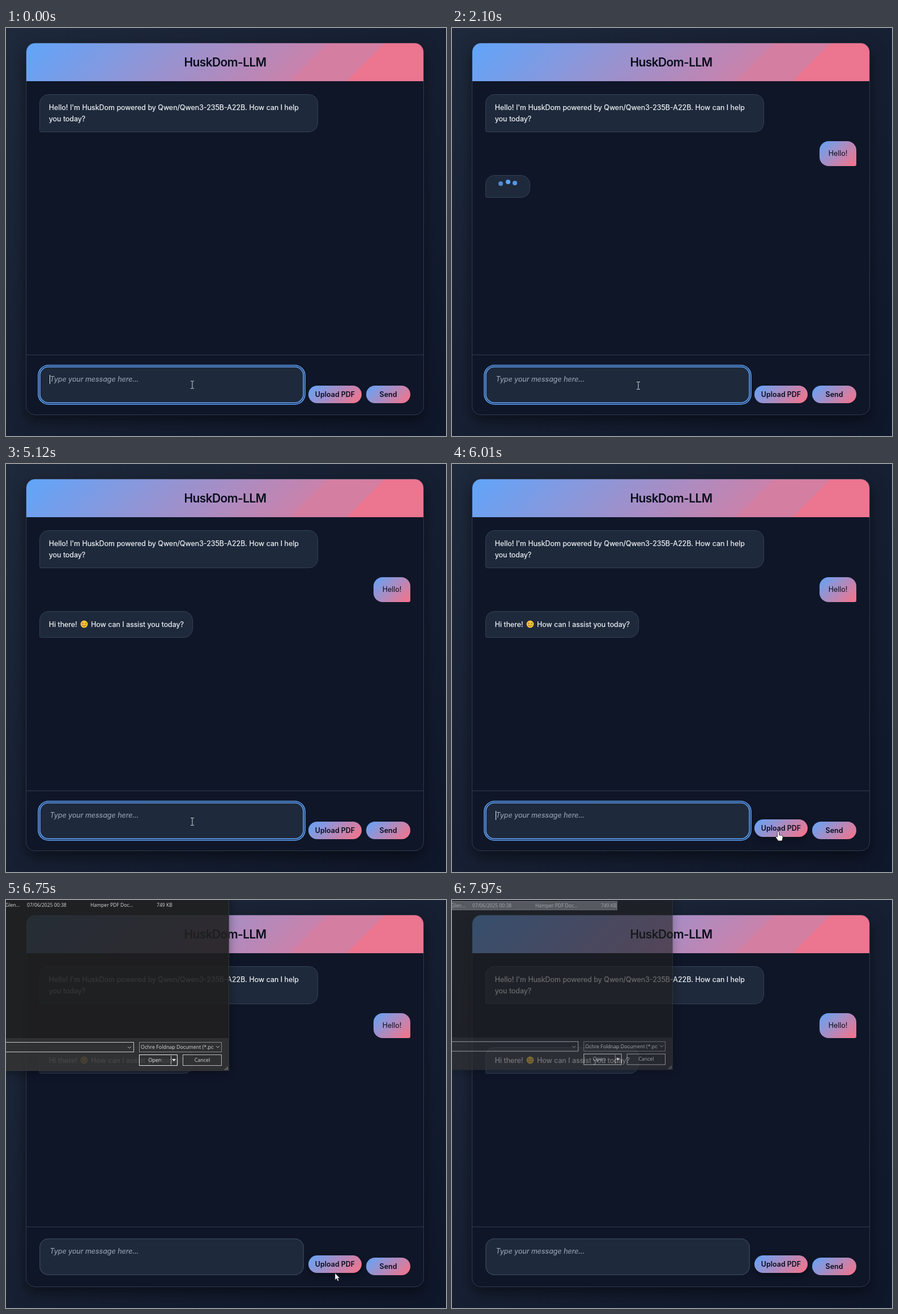
Write an HTML page that moves like this. It is 777 px wide and 721 px high and loops after 8000 ms.

```html
<!DOCTYPE html>
<html lang="en">
<head>
<meta charset="utf-8">
<title>Chat</title>
<style>
html, body { margin: 0; width: 100%; height: 100%; overflow: hidden; }
body { background: linear-gradient(135deg, #1e293b, #0f172a); font: 12.48px/20px Inter, sans-serif; color: #f1f5f9; }
div, svg, span.abs { position: absolute; box-sizing: border-box; white-space: nowrap; }
#card { left: 35px; top: 26px; width: 703px; height: 658px; border: 1px solid #303c50; border-radius: 16px;
  background: #0f1628; box-shadow: 0 10px 26px rgba(0,0,0,.5); overflow: hidden; }
#head { left: 0; top: 0; width: 702px; height: 67px; text-align: center; color: #080d1a;
  font-size: 21px; font-weight: 600; line-height: 67px; letter-spacing: -.6px;
  background: linear-gradient(135deg, #60a5fa, #c982ab 69.2%, #d47ea2 69.2%, #d47ea2 82.3%, #ec758f 82.3%); }
#rule { left: 0; top: 550px; width: 702px; height: 1px; background: #303c50; }
.bot { left: 59px; background: #1e293b; border: 1px solid #334155; border-radius: 16px 16px 16px 3px; padding: 12.5px 15.8px; }
.bot, #hint { -webkit-text-stroke: .2px; }
.grad { background: linear-gradient(135deg, #60a5fa, #fb7185); color: #080d1a; }
#user { left: 649px; top: 200px; width: 65px; height: 44px; line-height: 44px; text-align: center; border-radius: 16px 16px 3px 16px; }
.btn { top: 632px; height: 31px; line-height: 31px; border-radius: 16px; text-align: center; font-weight: 600; }
.dot { width: 8px; height: 8px; border-radius: 50%; background: #60a5fa; }
#box, #ring { left: 59px; top: 598px; width: 467px; height: 65px; border-radius: 16px; }
#box { background: #1e293b; box-shadow: inset 0 0 0 1.5px #334155; }
#ring { box-shadow: inset 0 0 0 1.6px #60a5fa, 0 0 0 1.2px #14203a, 0 0 0 2.8px #60a5fa; }
#hint { left: 77.5px; top: 611px; font-style: italic; color: #929daf; }
#typed { left: 76.5px; top: 611px; }
#caret { left: 100%; top: 2px; width: 1px; height: 16px; background: #f1f5f9; }
#dlg { left: -558px; top: -82px; width: 952px; height: 384px; background: #202020; border: 1px solid #3c3c3c;
  box-shadow: 0 3px 16px rgba(0,0,0,.4); transform-origin: 50% 50%; color: #eee; font: 8.6px/16px "Open Sans", sans-serif; }
/* moves the inner coordinates back to the stage's */
#in { left: 557px; top: 81px; width: 394px; height: 302px; }
#row { left: -400px; top: 1px; width: 695px; height: 16px; }
#foot { left: -557px; top: 244px; width: 950px; height: 57px; background: #333; }
.field, .push { font-size: 8.9px; }
.field { height: 18px; top: 251px; border: 1px solid #999; overflow: hidden; }
.push { top: 273px; height: 20px; line-height: 18px; text-align: center; border: 1px solid #ccc; }
</style>
</head>
<body>
<div id="card"><div id="head">HuskDom-LLM</div><div id="rule"></div></div>
<div class="bot" style="top:117px;width:492px;height:67px">Hello! I'm HuskDom powered by Qwen/Qwen3-235B-A22B. How can I help<br>you today?</div>
<div id="user" class="grad">Hello!</div>
<div id="wait" class="bot" style="top:260px;width:79px;height:40px">
  <div class="dot" style="left:22px"></div><div class="dot" style="left:34.5px"></div><div class="dot" style="left:47px"></div>
</div>
<div id="reply" class="bot" style="top:260px;width:271px;height:47px">Hi there!
  <svg style="left:71px;top:15px" width="14" height="14" viewBox="0 0 14 14" fill="none" stroke="#6b3f10" stroke-linecap="round">
    <circle cx="7" cy="7" r="6.4" fill="#fcc63a" stroke="none"/>
    <path d="M3 5.7q1.3-1.8 2.6 0M8.4 5.7q1.3-1.8 2.6 0M3.6 8.4q3.4 4 6.8 0"/>
  </svg>
  <span class="abs" style="left:90px">How can I assist you today?</span>
</div>
<div id="box"></div><div id="ring"></div>
<div id="hint">Type your message here...</div>
<div id="typed"><span id="text"></span><div id="caret"></div></div>
<div id="upload" class="btn grad" style="left:534px;width:94px">Upload PDF</div>
<div class="btn grad" style="left:636px;width:78px">Send</div>

<div id="dlg"><div id="in">
  <div id="row"></div>
  <span class="abs" style="left:-1px;top:1px">Glen...</span>
  <span class="abs" style="left:37px;top:1px">07/06/2025 00:38</span>
  <span class="abs" style="left:149px;top:1px">Hamper PDF Doc...</span>
  <span class="abs" style="left:266px;top:1px">749 KB</span>
  <div id="foot"></div>
  <div class="field" style="left:-400px;width:626px;border-color:#ddd"></div>
  <div class="field" style="left:235px;width:146px"><div style="left:2px;width:128px;overflow:hidden">Ochre Foldnap Document (*.pdf)</div></div>
  <div class="push" style="left:235px;width:68px;border:1.5px solid #fff;padding-right:12px">Open</div>
  <div class="push" style="left:312px;width:69px">Cancel</div>
  <svg width="394" height="302" fill="none" stroke="#ccc">
    <path d="M215 259l3 3 3-3M371 258l3 3 3-3M291.5 275v16"/>
    <path d="M293 281h7l-3.5 4z" fill="#fff" stroke="none"/>
    <path d="M386 299.5h6M388 297.5h4M390.5 295.5h2" stroke-dasharray="1.5 1"/>
  </svg>
</div></div>

<svg id="mouse" width="1" height="1" overflow="visible" style="left:0;top:0">
  <path d="M-3-6.5h2.5l.5.5.5-.5H3M0-6V6M-3 6.5h2.5L0 6l.5.5H3" fill="none" stroke="#d5d9df"/>
  <path d="M0 0V12l2.8-2.6 2 4.6 2-.9-2-4.4H8.5z" fill="#fff" stroke="#111" stroke-width=".6"/>
  <path d="M-1.5 1.5a1.5 1.5 0 0 1 3 0v5l5 1.2q2 .5 1.8 2.5l-.8 4.3-1 2.500h-6.5q-2.5-3.5-4.5-6.5 0-2 2-1.2l1 1z" fill="#fff" stroke="#111" stroke-width=".8"/>
</svg>

<script>
const $ = id => document.getElementById(id);
const LOOP = 8000, SENT = 1480, REPLY = 4450, BLUR = 6350, OPEN = 6645, CLOSE = 7900;
const clamp = x => Math.max(0, Math.min(1, x));
const ramp = (t, from, length) => clamp((t - from) / length);
const smooth = x => x * x * (3 - 2 * x);
const easeOut = x => 1 - (1 - x) ** 3;
const dots = [...document.querySelectorAll('.dot')];
const cursors = [...$('mouse').children];

// time, x, y of the pointer
const path = [
  [0, 329, 630.5], [69, 329, 630.5], [70, 329, 632], [5350, 329, 632], [5520, 430, 636],
  [5700, 550, 645], [5950, 576, 649], [6640, 576, 649], [6720, 581, 659.5], [6890, 581, 659.5],
  [6960, 515, 598], [7030, 280, 417], [7100, 44, 236], [7170, -200, 50], [LOOP, -200, 50]
];

function pointer(t) {
  const i = path.findIndex(p => p[0] > t);
  const [a, b] = [path[i - 1], path[i]];
  const k = (t - a[0]) / (b[0] - a[0]);
  return [a[1] + (b[1] - a[1]) * k, a[2] + (b[2] - a[2]) * k];
}

function caretOn(t) {
  if (t < 70) return true;
  if (t < 550 || t >= 6180) return false;
  if (t < SENT) return true;
  const left = (5120 - t + 2 * 1060) % 1060;
  return left > 0 && left <= 530;
}

function show(el, t, from, to) {
  const k = t < to ? smooth(ramp(t, from, 300)) : 0;
  el.style.opacity = k;
  el.style.transform = `translateY(${(1 - k) * 7.8}px)`;
}

function draw(t) {
  show($('user'), t, SENT - 30, LOOP);
  show($('wait'), t, SENT - 30, REPLY);
  show($('reply'), t, REPLY, LOOP);

  dots.forEach((dot, i) => {
    const p = ((t - 1495 - i * 160 + 2 * 1400) % 1400) / 1400;
    const k = smooth(clamp(1 - Math.abs(p - .3) / .3));
    dot.style.top = 15 - 7.8 * k + 'px';
    dot.style.opacity = .5 + .5 * k;
  });

  let count = 0;
  if (t >= 550 && t < SENT) count = t >= 1280 ? 6 : Math.min(5, 1 + Math.floor((t - 550) / 132));
  $('text').textContent = 'Hello!'.slice(0, count);
  $('hint').style.opacity = count ? 0 : 1;
  $('caret').style.opacity = caretOn(t) ? 1 : 0;
  $('ring').style.opacity = 1 - ramp(t, BLUR, 200);

  const lift = smooth(ramp(t, 5690, 300));
  $('upload').style.transform = `translateY(${-3.9 * lift}px)`;
  $('upload').style.boxShadow = `0 4px 12px rgba(0,0,0,${.4 * lift})`;

  const opened = easeOut(ramp(t, OPEN, 200)), closing = Math.max(0, t - CLOSE) / 70;
  $('dlg').style.opacity = opened * (1 - .35 * closing);
  $('dlg').style.transform = `scale(${.982 + .02 * opened - .0104 * closing})`;
  $('row').style.background = t < 7700 ? 'none' : t < 7770 ? '#4d4d4d' : '#777';
  $('row').style.boxShadow = t < 7770 ? 'none' : 'inset 0 0 0 1px #999';

  const [x, y] = pointer(t);
  const kind = t >= OPEN ? 1 : x > 534 ? 2 : x > 527 ? 1 : 0;
  cursors.forEach((c, i) => c.style.display = i === kind ? '' : 'none');
  $('mouse').style.transform = `translate(${x}px,${y}px)`;
}

const start = performance.now();
function tick() {
  draw((performance.now() - start) % LOOP);
  requestAnimationFrame(tick);
}
tick();
</script>
</body>
</html>
```
